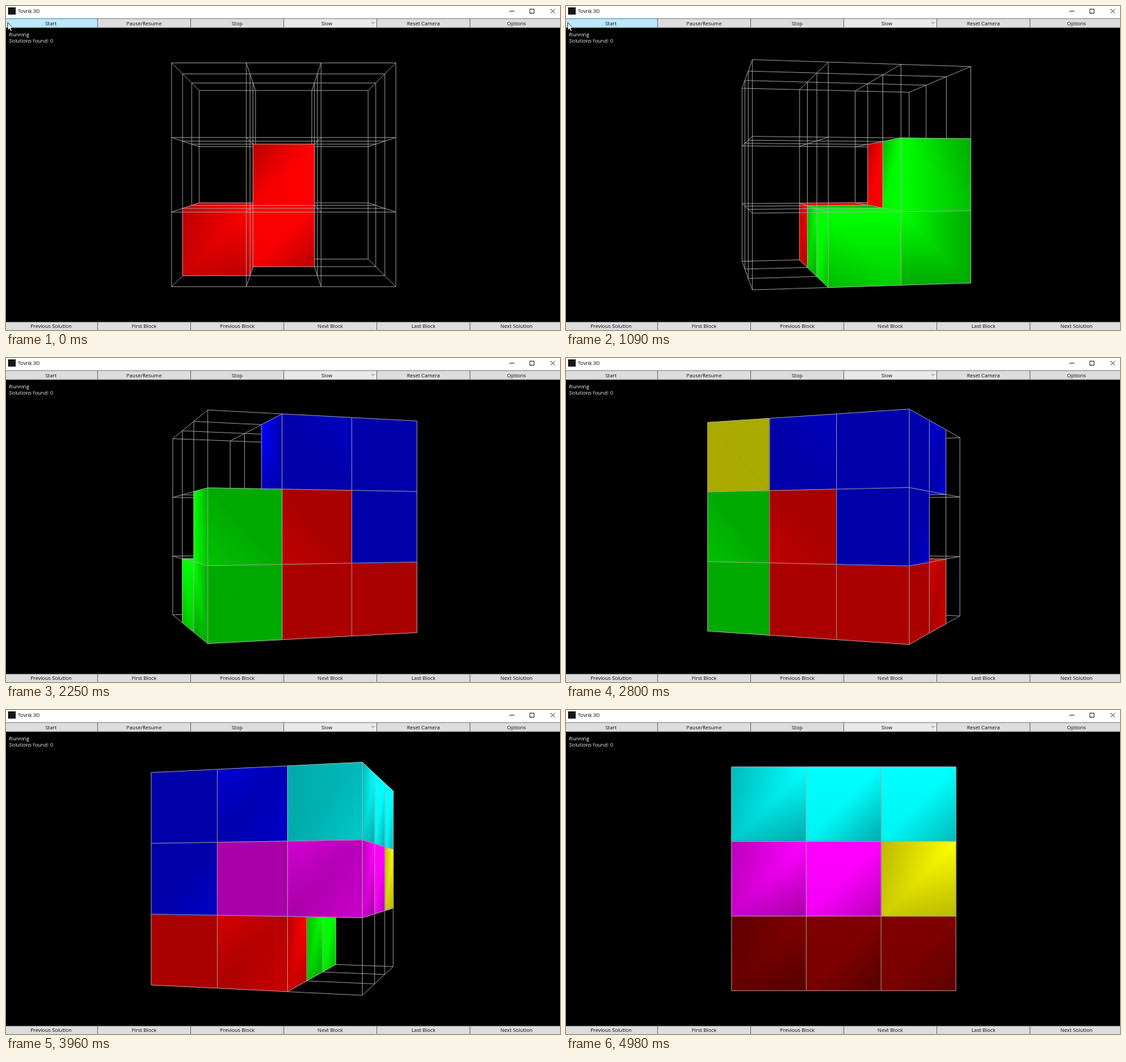
An HTML page with a canvas that plays this animation: 800 px wide and 469 px high, repeating every 5.06 s.

```html
<!DOCTYPE html>
<html lang="en">
<head>
<meta charset="utf-8">
<title>Tovrik 3D</title>
<style>
  html, body { margin: 0; width: 100%; height: 100%; overflow: hidden; background: #000; }
  canvas, svg { position: absolute; left: 0; top: 0; width: 100%; height: 100%; display: block; }
  text { font-family: "Open Sans", "Noto Sans", sans-serif; font-size: 7.4px; }
</style>
</head>
<body>
<canvas id="view" width="800" height="469"></canvas>
<svg id="ui" viewBox="0 0 800 469" preserveAspectRatio="none">
  <rect width="800" height="18" fill="#fff"/>
  <rect x="3" y="2" width="11" height="10.5" fill="#151515"/>
  <text x="17" y="10.2">Tovrik 3D</text>
  <g fill="none" stroke="#222" stroke-width=".9">
    <path d="M727 7.5h7M786.5 4.3l6.3 6.3M792.8 4.3l-6.3 6.3"/>
    <rect x="756.5" y="4.5" width="6" height="6"/>
  </g>
  <g id="bars"></g>
  <path d="M527.6 23.2l2.2 2 2.2-2" fill="none" stroke="#606060" stroke-width=".8"/>
  <g fill="#f0f0f0">
    <text x="4.5" y="43.6" style="font-size:7.5px">Running</text>
    <text x="4.5" y="52.8" style="font-size:7.5px">Solutions found: 0</text>
  </g>
  <path id="cursor" d="M2.5 24v11l2.5-2.3 1.7 3.8 1.7-.8-1.6-3.6h3.4z" fill="#fff" stroke="#000" stroke-width=".7"/>
</svg>
<script>
const LOOP = 5060, FRAMES = 65, STEPS_PER_PIECE = 10, HOVER_END = 25;
const CX = 401, CY = 244.3, FOCAL = 988, DIST = 10.65;

// Turn in degrees by step: steady, with one short slower stretch
const TURN = [[0, 0], [14, 79], [20, 111.5], [64, 360]];

// Cells from top to bottom, back to front, left to right
const GRID = "BBYBCYCCC" + "BRGMMYMMY" + "RRGRGGDDD";
const ORDER = "RGBYMCD";
const COLORS = {
  R: [255, 0, 0], G: [0, 255, 0], B: [0, 0, 255], Y: [255, 255, 0],
  M: [255, 0, 255], C: [0, 255, 255], D: [128, 0, 0]
};
const LIGHT = unit([1.4, 1.4, 2]), AMBIENT = 0.667, DIFFUSE = 0.7;
const SIGNS = [-1, 1];

const ctx = document.getElementById("view").getContext("2d");
const cursor = document.getElementById("cursor");
const bars = document.getElementById("bars");

function unit(v) {
  const len = Math.hypot(...v) || 1;
  return v.map(n => n / len);
}

function add(tag, attrs, text) {
  const el = document.createElementNS(bars.namespaceURI, tag);
  for (const k in attrs) el.setAttribute(k, attrs[k]);
  if (text) el.textContent = text;
  return bars.appendChild(el);
}

function buildBar(labels, y, h, baseline) {
  return labels.map((label, i) => {
    const x = -2.2 + i * 134.45;
    const rect = add("rect", {
      x, y, width: 134.45, height: h,
      fill: label === "Slow" ? "#e9e9e9" : "#ddd", stroke: "#707070", "stroke-width": 0.75
    });
    add("text", {
      x: x + (label === "Slow" ? 62 : 67.2), y: baseline, "text-anchor": "middle", fill: "#111"
    }, label);
    return rect;
  });
}

const startButton = buildBar(
  ["Start", "Pause/Resume", "Stop", "Slow", "Reset Camera", "Options"], 18.1, 13.2, 27.6)[0];
buildBar(["Previous Solution", "First Block", "Previous Block", "Next Block", "Last Block",
  "Next Solution"], 457.5, 12, 466.4);

function pieceAt([x, y, z]) {
  if (Math.max(Math.abs(x), Math.abs(y), Math.abs(z)) > 1) return "";
  return GRID[(1 - y) * 9 + (z + 1) * 3 + x + 1];
}

function shifted(pos, axis, by) {
  const p = pos.slice();
  p[axis] += by;
  return p;
}

function makeCell(index) {
  const pos = [index % 3 - 1, 1 - Math.floor(index / 9), Math.floor(index / 3) % 3 - 1];
  const piece = pieceAt(pos);
  const open = (axis, s) => pieceAt(shifted(pos, axis, s)) !== piece;

  // Corner normals add up the triangles that meet there
  function shade(corner) {
    const normal = corner.map((s, a) => {
      if (!open(a, s)) return 0;
      return corner[(a + 1) % 3] === corner[(a + 2) % 3] ? 2 * s : s;
    });
    const dot = unit(normal).reduce((sum, n, a) => sum + n * LIGHT[a], 0);
    return Math.min(1, AMBIENT + DIFFUSE * Math.max(0, dot));
  }

  const faces = [], edges = [];
  for (let a = 0; a < 3; a++) {
    const b = (a + 1) % 3, c = (a + 2) % 3;
    const at = (sa, sb, sc) => {
      const v = [];
      v[a] = sa; v[b] = sb; v[c] = sc;
      return v;
    };
    const place = v => v.map((s, k) => pos[k] + s / 2);
    for (const s of SIGNS) {
      const corners = [at(s, -1, -1), at(s, 1, -1), at(s, 1, 1), at(s, -1, 1)];
      if (open(a, s)) {
        faces.push({ a, s, points: corners.map(place), shades: corners.map(shade) });
      }
      for (const t of SIGNS) {
        edges.push({
          key: place(at(0, s, t)).join(), ends: [place(at(-1, s, t)), place(at(1, s, t))],
          sides: [[b, s], [c, t]]
        });
      }
    }
  }
  return { pos, piece, faces, edges };
}

const cells = Array.from(GRID, (_, i) => makeCell(i));

function fillTriangle(p, v, color) {
  const [x0, y0] = p[0];
  const ux = p[1][0] - x0, uy = p[1][1] - y0, wx = p[2][0] - x0, wy = p[2][1] - y0;
  const det = ux * wy - uy * wx;
  if (Math.abs(det) < 0.01) return;
  const du = v[1] - v[0], dw = v[2] - v[0];
  const gx = (du * wy - dw * uy) / det, gy = (dw * ux - du * wx) / det;
  const g2 = gx * gx + gy * gy;
  const lo = Math.min(...v), hi = Math.max(...v);
  const tone = k => `rgb(${color.map(n => Math.round(n * k)).join()})`;
  let paint = tone(lo);
  if (hi - lo > 0.004) {
    const spot = k => [x0 + gx * (k - v[0]) / g2, y0 + gy * (k - v[0]) / g2];
    paint = ctx.createLinearGradient(...spot(lo), ...spot(hi));
    paint.addColorStop(0, tone(lo));
    paint.addColorStop(1, tone(hi));
  }
  ctx.beginPath();
  p.forEach(q => ctx.lineTo(q[0], q[1]));
  ctx.closePath();
  ctx.fillStyle = ctx.strokeStyle = paint;
  ctx.lineWidth = 1;
  ctx.fill();
  ctx.stroke();
}

function drawCube(angle, shown) {
  const sin = Math.sin(angle), cos = Math.cos(angle);
  const eye = [DIST * sin, 0, DIST * cos];
  const project = ([x, y, z]) => {
    const k = FOCAL / (DIST - x * sin - z * cos);
    return [CX + (x * cos - z * sin) * k, CY - y * k];
  };
  const range = cell => Math.hypot(...cell.pos.map((n, a) => n - eye[a]));
  const nearFirst = cells.map(cell => ({ cell, d: range(cell) })).sort((m, n) => m.d - n.d);

  // Each grid edge is drawn once, with the nearest cell that touches it
  const taken = new Set();
  const jobs = nearFirst.map(({ cell }) => {
    const edges = cell.edges.filter(e => !taken.has(e.key));
    edges.forEach(e => taken.add(e.key));
    return { cell, edges };
  });

  ctx.fillStyle = "#000";
  ctx.fillRect(0, 0, 800, 469);
  ctx.lineJoin = "round";
  for (const { cell, edges } of jobs.reverse()) {
    const solid = shown.includes(cell.piece);
    const facing = (a, s) => s * eye[a] > s * cell.pos[a] + 0.5;
    if (solid) {
      for (const f of cell.faces) {
        if (!facing(f.a, f.s)) continue;
        const q = f.points.map(project);
        for (const tri of [[0, 1, 2], [0, 2, 3]]) {
          fillTriangle(tri.map(i => q[i]), tri.map(i => f.shades[i]), COLORS[cell.piece]);
        }
      }
    }
    ctx.beginPath();
    for (const e of edges) {
      if (solid && !e.sides.some(([a, s]) => facing(a, s))) continue;
      ctx.moveTo(...project(e.ends[0]));
      ctx.lineTo(...project(e.ends[1]));
    }
    ctx.strokeStyle = "#acacac";
    ctx.lineWidth = 0.8;
    ctx.stroke();
  }
}

function turnAt(step) {
  const i = Math.max(1, TURN.findIndex(([at]) => at >= step));
  const [s0, d0] = TURN[i - 1], [s1, d1] = TURN[i];
  return (d0 + (d1 - d0) * (step - s0) / (s1 - s0)) * Math.PI / 180;
}

let last = -1;
function render(time) {
  const step = Math.min(FRAMES - 1, Math.floor((time % LOOP) / LOOP * FRAMES + 0.26));
  if (step === last) return;
  last = step;
  const hover = step < HOVER_END;
  startButton.setAttribute("fill", hover ? "#bee6fd" : "#ddd");
  startButton.setAttribute("stroke", hover ? "#3c7fb1" : "#707070");
  cursor.setAttribute("visibility", hover ? "visible" : "hidden");
  drawCube(turnAt(step), ORDER.slice(0, 1 + Math.floor(step / STEPS_PER_PIECE)));
}

function tick() {
  render(performance.now());
  requestAnimationFrame(tick);
}
tick();
</script>
</body>
</html>
```
